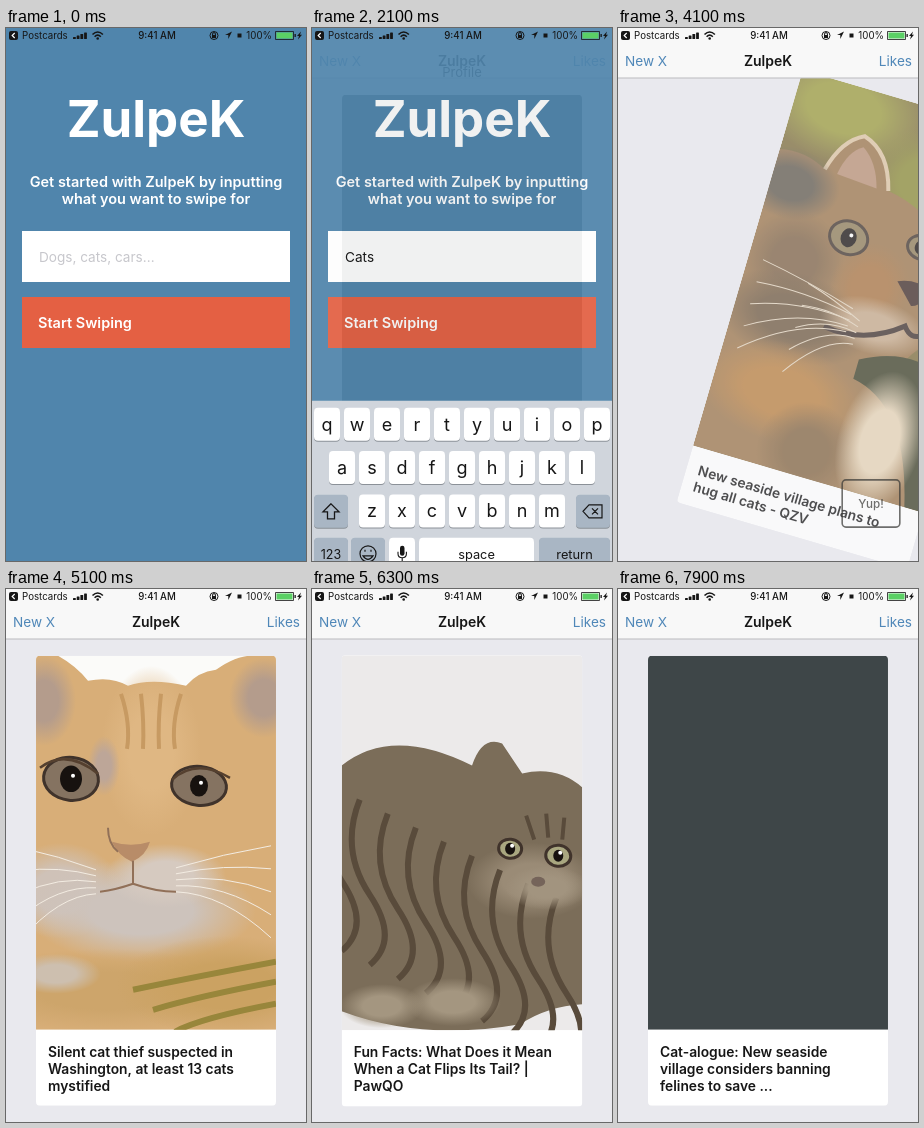
Recreate the animation shown at these times as an HTML page with a canvas. Size 300 by 533 pixels, loop 8000 ms.

```html
<!DOCTYPE html>
<html lang="en">
<head>
<meta charset="utf-8">
<style>
  html, body { margin: 0; width: 100%; height: 100%; overflow: hidden; }
  canvas { display: block; width: 100vw; height: 100vh; }
</style>
</head>
<body>
<canvas id="stage"></canvas>
<script>
const W = 300, H = 533, LOOP = 8000, STEP = 100;
const BLUE = '#5085ac', LINK = '#4f87b8', ORANGE = '#e46043', INK = '#161616';
const APP = 'ZulpeK';
const CARD_W = 240, CARD_H = 450;
const SWIPE_TIME = 400, SWIPE_REACH = 260;

const stage = document.getElementById('stage');
const scratch = document.createElement('canvas');
const ratio = window.devicePixelRatio || 1;
for (const c of [stage, scratch]) {
  c.width = W * ratio;
  c.height = H * ratio;
}
const scratchContext = scratch.getContext('2d');
let g = stage.getContext('2d');

// ---- helpers ----
const clamp = v => Math.min(1, Math.max(0, v));
const ease = (t, start, length) => {
  const u = clamp((t - start) / length);
  return u * u * (3 - 2 * u);
};

function text(str, x, y, size, { color = INK, weight = 400, align = 'left' } = {}) {
  g.font = `${weight} ${size}px Inter, Roboto, sans-serif`;
  g.textAlign = align;
  g.fillStyle = color;
  g.fillText(str, x, y);
}

function box(x, y, w, h, color, radius = 0) {
  g.fillStyle = color;
  g.beginPath();
  g.roundRect(x, y, w, h, radius);
  g.fill();
}

function oval(x, y, rx, ry, color, turn = 0) {
  g.fillStyle = color;
  g.beginPath();
  g.ellipse(x, y, rx, ry, turn, 0, 7);
  g.fill();
}

function shape(color, path) {
  g.fillStyle = color;
  g.fill(new Path2D(path));
}

function line(color, width, path) {
  g.strokeStyle = color;
  g.lineWidth = width;
  g.stroke(new Path2D(path));
}

function placed(x, y, scale, turn, draw) {
  g.save();
  g.translate(x, y);
  g.rotate(turn);
  g.scale(scale, scale);
  draw();
  g.restore();
}

// A soft patch of colour; color is a six-digit hex value.
function glow(x, y, rx, ry, color) {
  g.save();
  g.translate(x, y);
  g.scale(rx, ry);
  const fill = g.createRadialGradient(0, 0, 0, 0, 0, 1);
  fill.addColorStop(0.45, color);
  fill.addColorStop(1, color + '00');
  oval(0, 0, 1, 1, fill);
  g.restore();
}

// Draws a group as one flat layer with a common opacity.
function layer(alpha, draw) {
  if (alpha <= 0) return;
  if (alpha >= 1) return draw();
  const base = g;
  g = scratchContext;
  g.resetTransform();
  g.clearRect(0, 0, scratch.width, scratch.height);
  g.setTransform(base.getTransform());
  draw();
  g = base;
  g.save();
  g.resetTransform();
  g.globalAlpha = alpha;
  g.drawImage(scratch, 0, 0);
  g.restore();
}

// ---- pictures ----
function eye(x, y, rx, ry, iris, pupil) {
  oval(x, y, rx, ry, '#40332b', 0.1);
  oval(x, y, rx - 3, ry - 3, iris, 0.1);
  oval(x, y, pupil, pupil * 1.2, '#17120f');
  oval(x + 2, y - 3, 2, 2, '#fff');
}

function whiskers(x, y, reach, color) {
  for (let i = 0; i < 5; i++)
    line(color, 1, `M${x} ${y + i * 6} q${reach / 2} ${i * 4 - 14} ${reach} ${i * 17 - 22}`);
}

function sandyCat() {
  box(0, 0, 240, 391, '#7c6c3a');
  glow(50, 25, 85, 55, '#9a9a3c');
  glow(150, 75, 60, 55, '#8a8a34');
  shape('#9a7449', 'M0 82 Q25 76 49 89 Q57 56 78 46 Q106 54 116 92 Q168 99 198 147 Q221 207 188 237 Q163 267 193 307 L240 391 H0Z');
  line('#dcc3a0', 4, 'M49 89 Q57 56 78 46 Q106 54 116 92');
  shape('#b98f74', 'M62 90 Q66 65 80 57 Q97 68 104 93Z');
  glow(20, 112, 50, 36, '#5f584c');
  glow(45, 185, 50, 50, '#7d6143');
  glow(60, 240, 80, 45, '#6e583f');
  glow(125, 190, 40, 45, '#a8733f');
  glow(70, 315, 85, 50, '#b97f3e');
  glow(110, 365, 50, 50, '#82633f');
  shape('#3c3f26', 'M135 262 Q170 242 200 249 L240 287 V391 H220 Q195 292 135 282Z');
  glow(178, 335, 42, 72, '#e6d3b4');
  glow(140, 226, 55, 28, '#c5a888');
  eye(91, 148, 21, 18, '#8c7b55', 8);
  eye(163, 137, 15, 13, '#8c7b55', 6);
  shape('#3d2a26', 'M150 176 Q168 168 184 176 Q180 194 170 196Z');
  line('#3d2f2b', 5, 'M92 240 Q135 246 170 217 Q179 229 189 221');
  whiskers(115, 215, -100, '#e3d4bd');
  whiskers(125, 225, -60, '#e3d4bd');
}

function gingerCat() {
  box(0, 0, 240, 374, '#fbfbf9');
  shape('#d8ae78', 'M0 0 H22 Q40 10 52 25 Q75 20 92 30 Q115 22 150 30 Q162 16 180 14 Q200 0 215 0 H240 V374 H0Z');
  glow(8, 45, 32, 45, '#b49c8c');
  glow(228, 42, 35, 40, '#b49c8c');
  glow(115, 95, 50, 85, '#dfb783');
  for (const x of [85, 105, 125, 145])
    line('#c79a62', 4, `M${x} 38 q${(115 - x) / 3} 30 ${(115 - x) / 5} 55`);
  glow(68, 110, 16, 30, '#bda698');
  eye(35, 123, 29, 23, '#857361', 11);
  eye(163, 130, 29, 21, '#857361', 9);
  line('#55402f', 2.5, 'M4 112 Q30 92 62 118 M136 124 Q160 102 194 122');
  glow(25, 235, 60, 48, '#cfc2b8');
  glow(105, 255, 115, 52, '#cdc3bc');
  glow(130, 220, 60, 32, '#d6cac0');
  shape('#b88c68', 'M76 186 Q95 192 114 186 Q110 200 96 206 Q82 200 76 186Z');
  line('#917058', 2, 'M72 172 Q72 188 82 196 M97 205 V228 Q80 234 64 236 M97 228 Q120 236 140 236');
  glow(70, 335, 150, 42, '#cda56b');
  glow(190, 330, 110, 50, '#cba262');
  glow(20, 318, 45, 20, '#cdbfaf');
  for (const y of [322, 342, 364])
    line('#98863b', 6, `M${y - 225} ${y + 12} Q165 ${y - 2} 240 ${y - 16}`);
  whiskers(60, 214, -75, '#f3ece2');
  whiskers(140, 212, 95, '#f3ece2');
}

function tabbyCat() {
  box(0, 0, 240, 374, '#eceaea');
  shape('#7b6d59', 'M0 110 Q50 70 130 110 Q140 80 160 88 L180 118 Q215 110 240 132 V348 Q205 350 178 368 Q80 385 0 355Z');
  glow(190, 225, 65, 38, '#9a8b76');
  for (let i = 0; i < 9; i++)
    line('#594b3b', 6, `M${i * 28 - 10} ${130 + i * 14} q-20 50 10 95 t0 70`);
  glow(205, 232, 42, 22, '#a2947f');
  line('#594b3b', 4, 'M184 160 l8 24 M204 158 l2 24 M222 162 l-2 22');
  eye(216, 200, 14, 12, '#a9a780', 5);
  eye(168, 193, 13, 11, '#a9a780', 5);
  oval(196, 226, 7, 5, '#75645a');
  glow(111, 346, 48, 24, '#a49680');
  glow(40, 350, 42, 22, '#a49680');
}

// ---- cards: when each enters, shows its picture and is swiped away ----
const cards = [
  { enter: 0, loaded: 2700, swipe: 3945, dir: 1, drift: 0, picture: sandyCat,
    lines: ['New seaside village plans to', 'hug all cats - QZV'] },
  { enter: 4345, loaded: 4750, swipe: 5385, dir: 1, drift: 0, picture: gingerCat,
    lines: ['Silent cat thief suspected in', 'Washington, at least 13 cats', 'mystified'] },
  { enter: 5785, loaded: 6200, swipe: 6634, dir: -1, drift: 0.1, picture: tabbyCat,
    lines: ['Fun Facts: What Does it Mean', 'When a Cat Flips Its Tail? |', 'PawQO'] },
  { enter: 7034, loaded: Infinity, swipe: Infinity, dir: 1, drift: 0,
    lines: ['Cat-alogue: New seaside', 'village considers banning', 'felines to save ...'] },
];

function spring(seconds) {
  const phase = 8.6 * seconds;
  return 1 - Math.exp(-12.5 * seconds) * (Math.cos(phase) + 1.45 * Math.sin(phase));
}

// The picture takes the height that the caption leaves.
function drawCard(card, t) {
  const pictureHeight = CARD_H - 25 - 17 * card.lines.length;
  g.translate(-CARD_W / 2, -CARD_H / 2);
  g.beginPath();
  g.roundRect(0, 0, CARD_W, CARD_H, 4);
  g.clip();
  box(0, 0, CARD_W, CARD_H, '#fff');
  g.save();
  g.beginPath();
  g.rect(0, 0, CARD_W, pictureHeight);
  g.clip();
  if (t >= card.loaded) card.picture();
  else box(0, 0, CARD_W, pictureHeight, '#3e4648');
  g.restore();
  card.lines.forEach((str, i) =>
    text(str, 12, pictureHeight + 27 + 17 * i, 13.8, { weight: 600 }));
}

function badge(label, x, width, color, amount) {
  layer(amount, () => placed(x, 475.5, 0.8 + 0.2 * amount, 0, () => {
    g.strokeStyle = color;
    g.lineWidth = 1.7;
    g.beginPath();
    g.roundRect(-width / 2, -25, width, 50, 4);
    g.stroke();
    text(label, 0, 4.5, 12.3, { color, align: 'center', weight: 500 });
  }));
}

function cardScreen(t) {
  box(0, 0, W, H, '#e9e9ee');
  const card = cards.findLast(c => t >= c.enter);
  const x = card.dir * SWIPE_REACH * ease(t, card.swipe, SWIPE_TIME);
  const scale = card.enter ? spring((t - card.enter) / 1000) : 1;
  layer(1 - Math.abs(x) / 320, () =>
    placed(150 + x, 291.8 + x * card.drift, scale, x * 0.1875 * Math.PI / 180,
      () => drawCard(card, t)));
  badge('Nope!', 51, 69, '#dc5433', clamp(-x / 120));
  badge('Yup!', 253, 61, '#3b3b38', clamp(x / 120));

  box(0, 0, W, 50, '#f8f8f8');
  box(0, 49.5, W, 1, '#bcbcc0');
  text('New X', 7, 38, 13.6, { color: LINK });
  text(APP, 150, 37.5, 14, { weight: 600, align: 'center' });
  text('Likes', 294, 38, 13.6, { color: LINK, align: 'right' });
}

function startScreen(t) {
  const typed = 'Cats'.slice(0, Math.max(0, Math.floor((t - 650) / 250)));
  const white = { color: '#fff', weight: 600, align: 'center' };
  box(0, 0, W, H, BLUE);
  text(APP, 150, 109, 51, { ...white, weight: 700 });
  text(`Get started with ${APP} by inputting`, 150, 159, 14.5, white);
  text('what you want to swipe for', 150, 176, 14.5, white);
  box(16, 203, 268, 51, '#fff');
  text(typed || 'Dogs, cats, cars...', 33, 234, 13.6, { color: typed ? INK : '#c7c7cc' });
  box(16, 269, 268, 51, ORANGE);
  text('Start Swiping', 32, 300, 14.5, { ...white, align: 'left' });
}

// ---- keyboard ----
function key(x, y, w, label, size, color = '#fff') {
  box(x, y + 1, w, 33, '#8b9198', 4);
  box(x, y, w, 33, color, 4);
  text(label, x + w / 2, y + 17 + size * 0.33, size, { align: 'center' });
}

function keyboard(t) {
  const top = 360 + 173 * (1 - ease(t, 350, 300) + ease(t, 2050, 300));
  if (top >= H) return;
  const grey = '#a9b6c4';
  g.save();
  g.translate(0, top);
  box(0, 0, W, 173, '#d0d5dc');
  ['qwertyuiop', 'asdfghjkl', 'zxcvbnm'].forEach((row, r) => {
    const letters = t < 900 ? row.toUpperCase() : row;
    [...letters].forEach((ch, i) =>
      key([2, 17, 47][r] + i * 30, 7 + r * 43.3, 26, ch, 18));
  });
  key(2, 94, 34, '', 1, grey);
  key(264, 94, 34, '', 1, grey);
  key(2, 137, 34, '123', 12.5, grey);
  key(39, 137, 34, '', 1, grey);
  key(77, 137, 26, '', 1);
  key(107, 137, 115, 'space', 12.8);
  key(227, 137, 71, 'return', 12.8, grey);
  line(INK, 1.3, 'M19 103 l-8 8 h4.5 v7 h7 v-7 h4.5Z');
  line(INK, 1.2, 'M277 104 h13 v13 h-13 l-6 -6.5Z M280 107.5 l6 6 m0 -6 l-6 6');
  line(INK, 1.2, 'M64 153 a8 8 0 1 0 -16 0 a8 8 0 1 0 16 0 M51 155 q5 7 10 0Z M53 149 v2 M59 149 v2');
  box(88, 145, 4.5, 10, INK, 2.2);
  line(INK, 1.1, 'M86 151 v2 q0 4 4.2 4 t4.2 -4 v-2 M90.2 157 v4 M87 161 h6.5');
  g.restore();
}

function statusBar() {
  box(3, 3, 9, 9, INK, 2);
  line('#fff', 1.2, 'M8.7 5 l-2.5 2.5 l2.5 2.5');
  text('Postcards', 16, 11, 9.7);
  for (let i = 0; i < 4; i++) box(67 + i * 3.7, 9 - i * 1.5, 2.8, 2 + i * 1.5, INK, 0.5);
  line(INK, 1.6, 'M86.5 6.5 q5.2 -5 10.4 0 M88.6 8.7 q3.1 -3 6.2 0');
  oval(91.7, 10.5, 1.3, 1.3, INK);
  text('9:41 AM', 151, 11, 9.7, { weight: 500, align: 'center' });
  line(INK, 1, 'M212 7.5 a4 4 0 1 0 -8 0 a4 4 0 1 0 8 0 M206.6 7 v-1 a1.4 1.4 0 0 1 2.8 0 v1');
  box(206, 7, 4, 3, INK);
  shape(INK, 'M226 3.5 l-7 3.6 h3.3 v4Z');
  box(231.5, 5.5, 4, 4, INK);
  text('100%', 266, 11, 9.7, { align: 'right' });
  line(INK, 0.8, 'M269.5 3.5 h18 v8 h-18Z');
  box(270.5, 4.5, 16, 6, '#5bd065');
  box(288.5, 6, 1.3, 3, INK);
  shape(INK, 'M295 3.5 l-4 4.5 h2 l-1 3.5 l4 -4.8 h-2Z');
}

function render(t) {
  g.setTransform(stage.width / W, 0, 0, stage.height / H, 0, 0);
  const reveal = ease(t, 2050, 300);
  if (reveal > 0) cardScreen(t);
  if (reveal > 0 && reveal < 1) text('Profile', 150, 49, 13, { align: 'center' });
  layer(1 - reveal, () => startScreen(t));
  keyboard(t);
  statusBar();
}

function tick(now) {
  render(Math.floor((now % LOOP) / STEP) * STEP);
  requestAnimationFrame(tick);
}
tick(performance.now());
</script>
</body>
</html>
```
